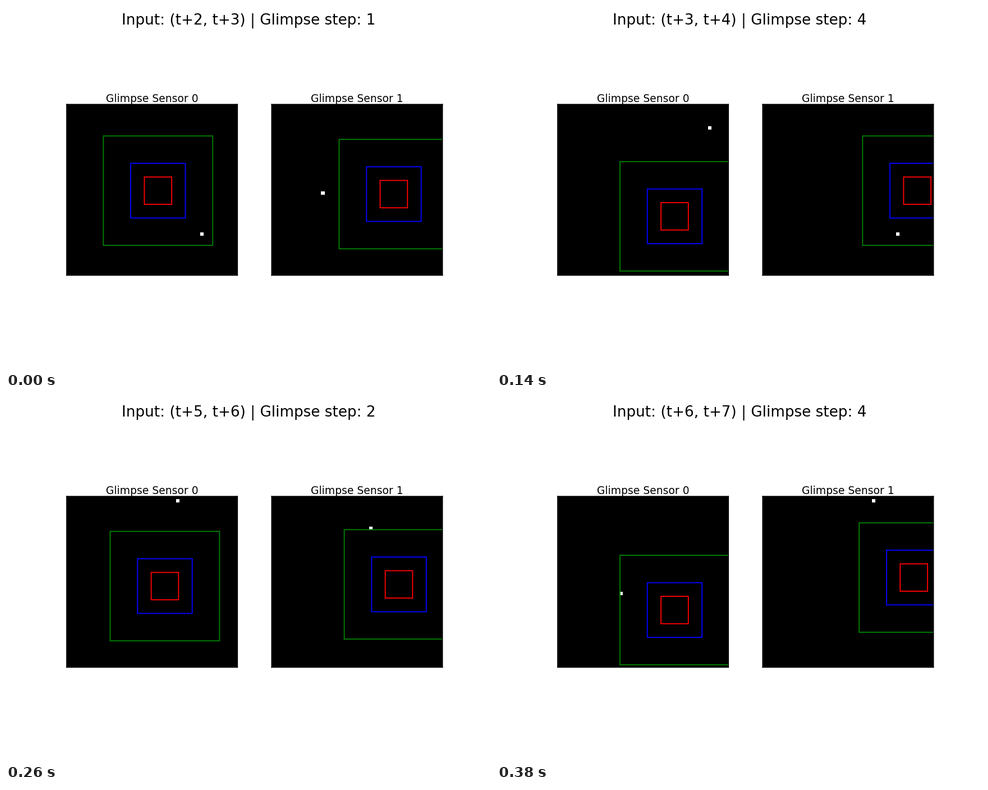
These frames come from a looping animation (864x648 px, 0.4 s). A matplotlib script:

```python
import matplotlib.pyplot as plt
import numpy as np
from matplotlib.animation import FuncAnimation
from matplotlib.patches import Rectangle

SIZE = 100                  # cells per side of the input image
STEPS = 4                   # glimpses per input pair
FIRST = 2                   # time index of the first input pair
BOXES = ((16, "r"), (32, "b"), (64, "g"))

# Ball cell (column, row) at each time; sensor 1 lags sensor 0 by one.
BALL = ((29, 51), (78, 75), (88, 13), (57, 18), (64, 2), (36, 56))

# Glimpse centres (x0, y0, x1, y1) at the start and end of each input pair.
HOME = (53, 50, 71.4, 52)
PATHS = (
    (HOME, (58, 53, 67, 57)),
    (HOME, (68, 65, 90, 50)),
    (HOME, (65, 60, 84, 48)),
    (HOME, (65, 57, 91, 47)),
    ((60, 52, 73, 50), (68, 66, 88, 47)),
)
EASE = np.array((1, 1, 2, 2))   # sensor 0 moves evenly, sensor 1 eases in

plt.rcParams["font.family"] = "DejaVu Sans"
fig, axes = plt.subplots(1, 2, figsize=(6.4, 4.8), dpi=135)
header = fig.suptitle("", fontsize=14)


def make_sensor(ax, index):
    ax.set_title(f"Glimpse Sensor {index}", fontsize=10, y=1.0, pad=2)
    ax.xaxis.set_visible(False)
    ax.yaxis.set_visible(False)
    for spine in ax.spines.values():
        spine.set_snap(False)
    image = ax.imshow(np.zeros((SIZE, SIZE)), cmap="gray", vmin=0, vmax=1)
    rects = [
        ax.add_patch(Rectangle((0, 0), side, side, lw=1, ec=color,
                               fill=False, snap=False))
        for side, color in BOXES
    ]
    return image, rects


sensors = [make_sensor(ax, i) for i, ax in enumerate(axes)]


def ball_image(col, row):
    cells = np.zeros((SIZE, SIZE))
    cells[row:row + 2, col:col + 2] = 1
    return cells


def glimpse_centres(pair, step):
    start, end = np.array(PATHS[pair])
    progress = (step / (STEPS - 1)) ** EASE
    return np.rint(start + (end - start) * progress).reshape(2, 2)


def update(frame):
    pair, step = divmod(frame, STEPS)
    t = FIRST + pair
    header.set_text(f"Input: (t+{t}, t+{t + 1}) | Glimpse step: {step + 1}")
    centres = glimpse_centres(pair, step)
    for i, (image, rects) in enumerate(sensors):
        image.set_data(ball_image(*BALL[pair + 1 - i]))
        for rect, (side, _) in zip(rects, BOXES):
            rect.set_xy(centres[i] - side / 2)
    return [header]


anim = FuncAnimation(fig, update, frames=STEPS * len(PATHS), interval=20,
                     init_func=lambda: update(0), repeat=True, repeat_delay=0)
plt.show()
```
